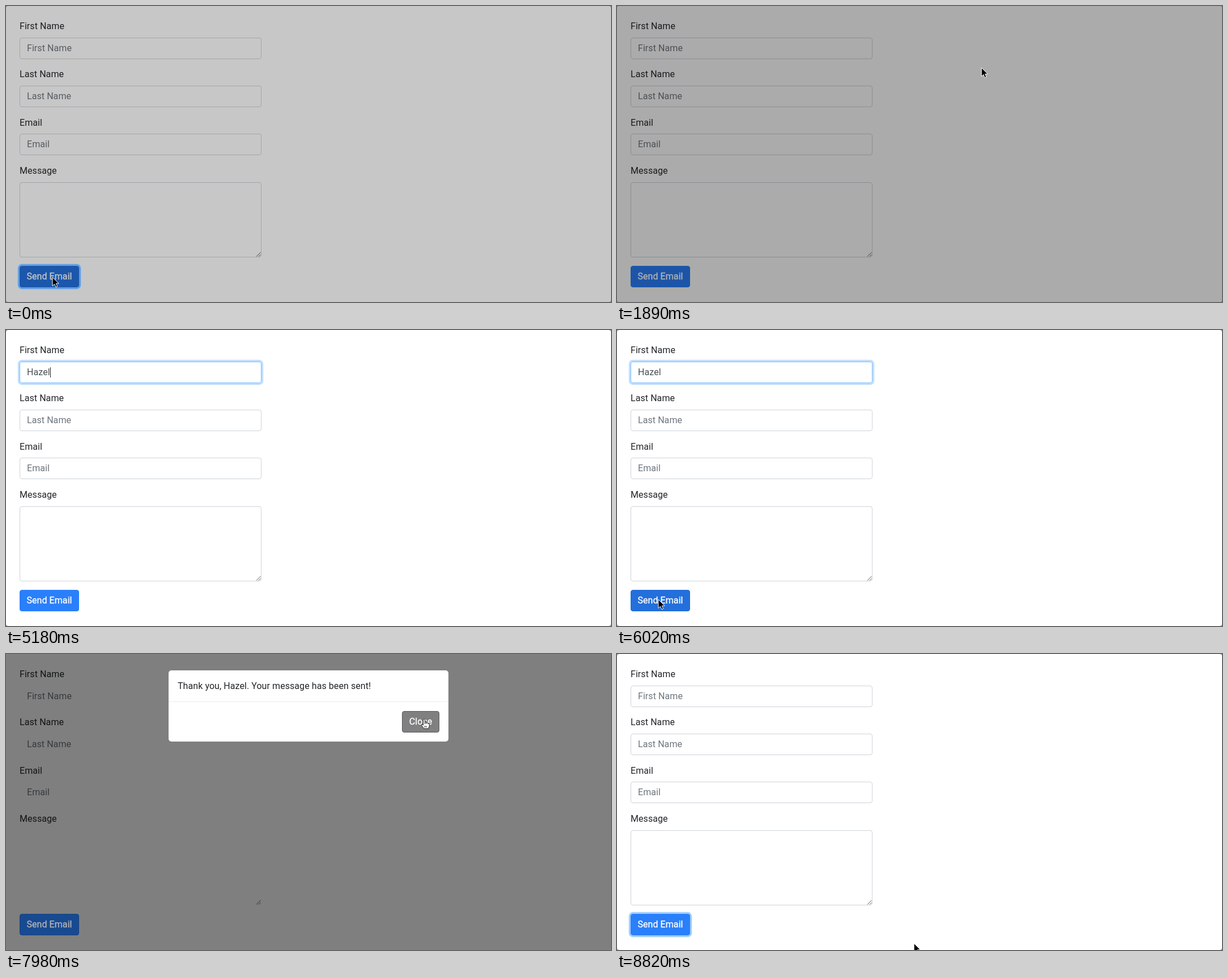
An HTML page for the animation above (8890 ms loop, 1068 by 524 pixels).

```html
<!DOCTYPE html>
<html lang="en">
<head>
<meta charset="utf-8">
<title>Contact form</title>
<style>
  html, body { margin: 0; width: 100%; height: 100%; overflow: hidden; background: #777; }
  body { font: 16px/24px Roboto, Arial, sans-serif; letter-spacing: .07px; color: #212529; }
  #stage { position: absolute; inset: 0; width: 1068px; height: 524px; overflow: hidden; border-radius: 4px; background: #fff; }
  #stage div, #stage svg { position: absolute; box-sizing: border-box; white-space: pre; }
  .label { left: 24px; }
  .field { left: 24px; width: 427px; height: 38px; padding: 6px 12px; border: 1px solid #ced4da; border-radius: 4px; color: #6c757d; }
  .dim .field { border-color: #fff; }
  #caret { display: inline-block; width: 1px; height: 18px; margin-right: -1px; vertical-align: -4px; background: #222; }
  #backdrop { inset: 0; background: #000; }
  .btn { height: 38px; line-height: 36px; border: 1px solid; border-radius: 4px; text-align: center; color: #fff; -webkit-text-stroke: .3px; }
  #send { left: 24px; top: 460px; width: 105px; }
  #modal { left: 287px; top: 28.5px; width: 494px; height: 126px; border-radius: 5px; background: #fff; }
  #msg { left: 0; top: 0; right: 0; height: 56px; padding: 16px; border-bottom: 1px solid #e9ecef; }
  #close { left: 412px; top: 72.5px; width: 66px; background: #808080; }
  #mouse { left: 0; top: 0; overflow: visible; }
</style>
</head>
<body>
<div id="stage">
  <div id="form"></div>
  <svg style="left:441px;top:435px" width="9" height="9" stroke="#555" fill="none"><path d="M1 8.5L8.5 1M5 8.5L8.5 5"/></svg>
  <div id="backdrop"></div>
  <div id="send" class="btn">Send Email</div>
  <div id="modal">
    <div id="msg"></div>
    <div id="close" class="btn">Close</div>
  </div>
  <svg id="mouse" width="1" height="1">
    <path id="arrow" d="M0 0V15.5L3.6 12.2 6 17.6 8.7 16.4 6.3 11.2H11.2Z" fill="#000" stroke="#fff"/>
    <path id="beam" d="M-3.5-7.5Q0-7.5 0-5Q0-7.5 3.5-7.5M0-6V6M-3.5 7.5Q0 7.5 0 5Q0 7.5 3.5 7.5M-2 2.5H2" fill="none" stroke="#333" stroke-width="1.2"/>
    <path id="hand" d="M-1.5 1Q0-1 1.5 1V6Q3 5 4 6.5Q6 5.5 7 7.5Q9 7 9.3 9V13L7.5 17H0L-4.5 11.5Q-5 9.5-3 9.7L-1.5 11ZM1.5 6V9M4 6.5V9M7 7.5V9.5M1.5 12V15M4 12V15" fill="#fff" stroke="#222" stroke-linejoin="round"/>
  </svg>
</div>
<script>
const LOOP = 8890, NAME = 'Hazel';
const KEYS = [3290, 3640, 3780, 3920, 4060];
const FOCUS = 2490, SUBMIT = 6090;
// backdrop in, dialog in, dialog out, backdrop out
const DIALOGS = [
  { times: [-65, 90, 1540, 1840], text: 'Sorry, some required fields are missing.' },
  { times: [SUBMIT, 6240, 8260, 8560], text: `Thank you, ${NAME}. Your message has been sent!` }
];
// time, x, y, optional power of the easing (default: smooth)
const PATH = [
  [0, 82, 480], [480, 82, 480], [1250, 738, 115], [1700, 738, 115],
  [2450, 152, 79], [4600, 152, 79], [5120, 560, 530], [5390, 560, 530],
  [5950, 73, 477], [6650, 73, 477], [7350, 738, 115], [8330, 738, 115],
  [8610, 689, 244, 2], [8820, 525, 511, 1], [LOOP, 470, 600, 1]
];

const $ = id => document.getElementById(id);
const ramp = (t, from, len = 150) => Math.min(1, Math.max(0, (t - from) / len));
const pulse = (t, on, off) => ramp(t, on) - ramp(t, off);
const easeOut = p => 1 - (1 - p) ** 2;
const inside = ([x, y], l, t, r, b) => x > l && x < r && y > t && y < b;
const shade = (rgb, k) => `rgb(${rgb.map(c => c * k)})`;

const labels = ['First Name', 'Last Name', 'Email', 'Message'];
$('form').innerHTML = labels.map((s, i) => {
  const y = 24 + i * 85.4;
  const size = i == 3 ? ';height:133px' : '';
  return `<div class="label" style="top:${y}px">${s}</div>
    <div class="field" style="top:${y + 31.5}px${size}">${i == 3 ? '' : s}</div>`;
}).join('');
const first = document.querySelector('.field');

function mouseAt(t) {
  const i = PATH.findIndex(k => k[0] > t);
  const [t0, x0, y0] = PATH[i - 1], [t1, x1, y1, power] = PATH[i];
  const p = (t - t0) / (t1 - t0);
  const e = power ? p ** power : p * p * (3 - 2 * p);
  return [x0 + (x1 - x0) * e, y0 + (y1 - y0) * e];
}

function drawFirstField(t) {
  const focus = pulse(t, FOCUS, SUBMIT);
  const typed = t < SUBMIT ? KEYS.filter(k => k <= t).length : 0;
  const since = t - (typed ? KEYS[typed - 1] : FOCUS);
  const caret = t >= FOCUS && t < SUBMIT && since % 1000 < 520;
  const mark = caret ? '<span id="caret"></span>' : '';
  first.innerHTML = typed ? NAME.slice(0, typed) + mark : mark + labels[0];
  first.style.color = typed ? '#495057' : '';
  first.style.borderColor = focus > .5 ? '#80bdff' : '';
  first.style.boxShadow = `0 0 0 3.2px rgba(0,123,255,${.25 * focus})`;
}

function draw(now) {
  const t = now % LOOP;
  const { times: [dimIn, showIn, showOut, dimOut], text } = DIALOGS[t < 4000 ? 0 : 1];
  const dim = .5 * pulse(t, dimIn, dimOut);
  const shown = pulse(t, showIn, showOut);
  const lift = 1 - easeOut(ramp(t, showIn, 300)) + easeOut(ramp(t, showOut, 300));
  const pos = mouseAt(t);

  drawFirstField(t);
  $('stage').className = dim > .45 ? 'dim' : '';
  $('backdrop').style.opacity = dim;
  $('msg').textContent = text;
  $('modal').style.opacity = shown;
  $('modal').style.transform = `translateY(${-31 * lift}px)`;

  const overSend = dim < .3 && inside(pos, 24, 460, 129, 498);
  const ring = 1 - ramp(t, 90) + pulse(t, 1990, FOCUS) + pulse(t, 6050, 6240) + ramp(t, 8710);
  const blue = overSend ? [35, 111, 219] : [42, 127, 251];
  const send = $('send').style;
  send.background = shade(blue, Math.max(.58, 1 - dim));
  send.borderColor = shade(blue, 1 - dim);
  send.color = shade([255, 255, 255], Math.max(.7, 1 - dim));
  send.boxShadow = `0 0 0 3.2px rgba(0,123,255,${.5 * ring})`;

  const overClose = shown > .5 && inside(pos, 699, 101, 765, 139);
  const overField = dim == 0 && pos[0] > 24 && pos[0] < 451 &&
    [55, 141, 226, 312].some((y, i) => pos[1] > y && pos[1] < y + (i == 3 ? 132 : 38));
  $('close').style.borderColor = overClose ? '#545b62' : '#6c757d';

  const shape = overClose ? 'hand' : overField ? 'beam' : 'arrow';
  for (const id of ['arrow', 'beam', 'hand']) $(id).style.display = id == shape ? '' : 'none';
  $('mouse').style.transform = `translate(${pos[0]}px,${pos[1]}px)`;
  $('mouse').style.visibility = t >= KEYS[0] && t < 4600 ? 'hidden' : '';
  requestAnimationFrame(() => draw(performance.now()));
}
draw(performance.now());
</script>
</body>
</html>
```
